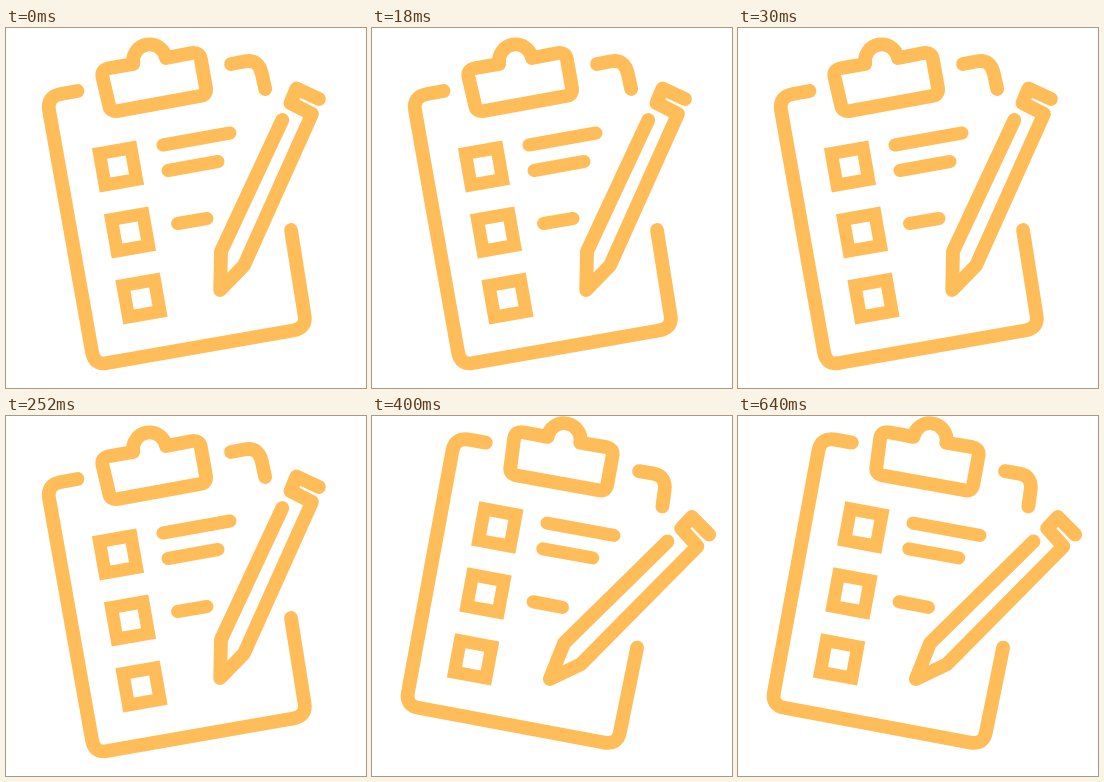
An HTML page that plays this animation: 360 px wide and 360 px high, repeating every 800 ms.

```html
<!DOCTYPE html>
<html lang="en">
<head>
<meta charset="utf-8">
<title>Checklist</title>
<style>
html, body { margin: 0; width: 100%; height: 100%; overflow: hidden; background: #fff; }
svg { display: block; width: 100vw; height: 100vh; }
</style>
</head>
<body>
<svg viewBox="0 0 360 360">
  <defs>
    <rect id="box" x="-16" y="-16" width="32" height="32" transform="rotate(-10)" stroke-linejoin="miter"/>
  </defs>
  <g id="note" fill="none" stroke="#ffbd59" stroke-width="13" stroke-linecap="round" stroke-linejoin="round">
    <g stroke-width="13.8">
      <!-- board -->
      <path d="M71.5 63L55 66Q41 68.5 43 82L86 324Q88.5 337.5 101 335L287 302.5Q301 300 298.5 287L285 202"/>
      <path d="M225 36L239.5 33.3Q252.5 31 255.8 45.5L259.2 61"/>
      <!-- clip -->
      <path d="M104 40L127.3 36A16.6 16.6 0 0 1 160 30L186 25Q194 24 195 32L200 60Q201 67 194 68L112 83Q104 84 103 77L96.5 49Q95 41.5 104 40Z"/>
      <!-- pencil -->
      <path d="M313 71L290.5 60.5L284.5 75L306 86L238 237.5L214.2 262L215 223.5L276.3 92"/>
    </g>
    <use href="#box" transform="translate(112 138.5)"/>
    <use href="#box" transform="translate(124 204.5)"/>
    <use href="#box" transform="translate(135.5 270.5)"/>
    <path d="M157 117L224 105M162 142.5L212 133.5M171.5 195.5L201 190.5"/>
  </g>
</svg>
<script>
const LOOP = 800;
const note = document.getElementById('note');
const start = performance.now();

function draw(time) {
  const tilted = time % LOOP >= LOOP / 2;
  note.setAttribute('transform', tilted ? 'translate(-34.4 -27.1) rotate(20.5 135.5 270.5)' : '');
}

function tick() {
  draw(performance.now() - start);
  requestAnimationFrame(tick);
}
tick();
</script>
</body>
</html>
```
